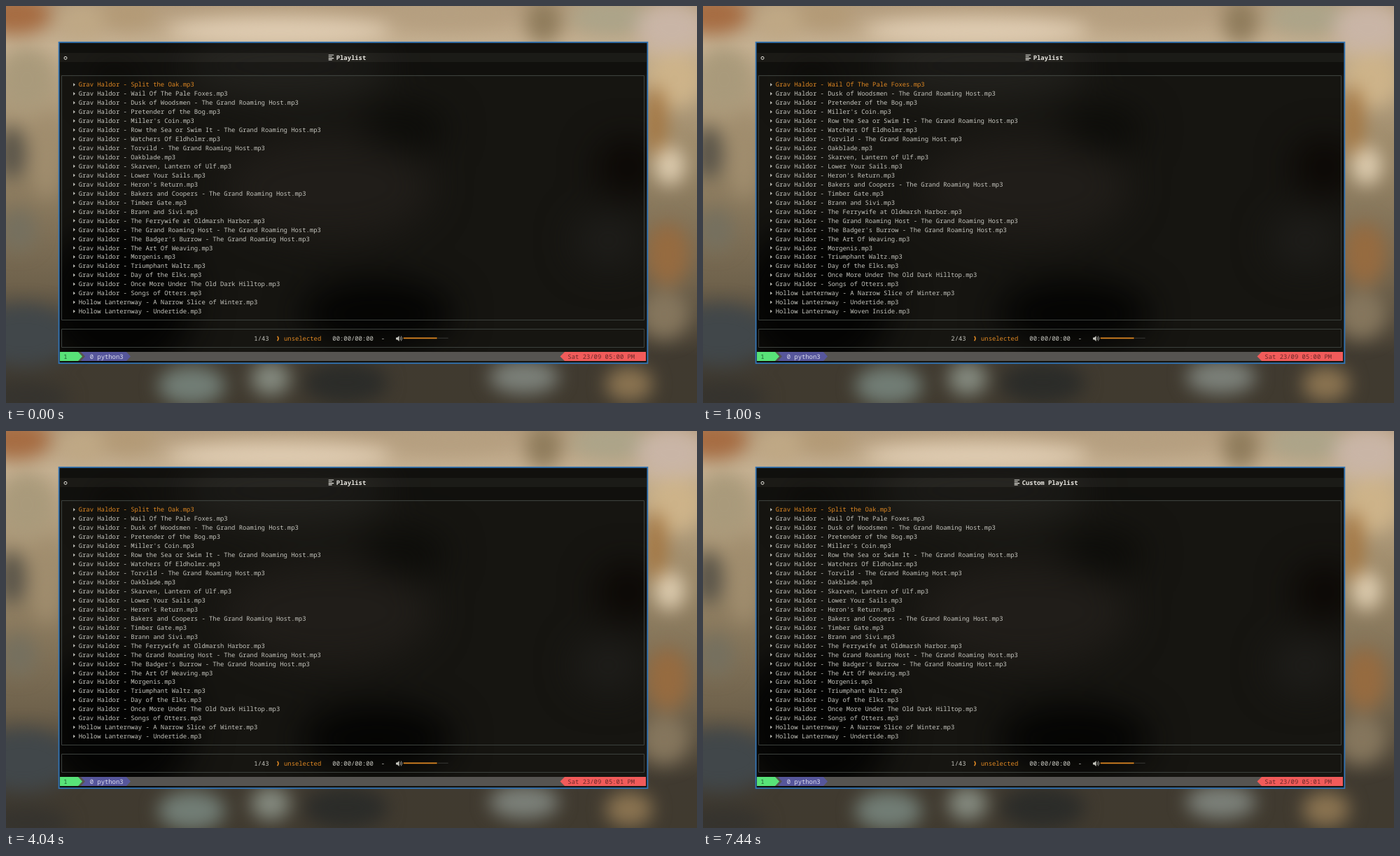
Recreate the animation shown at these times as an HTML page. Size 987x567 px, loop 8000 ms.

```html
<!DOCTYPE html>
<html lang="en">
<head>
<meta charset="utf-8">
<title>Terminal playlist</title>
<style>
html, body { margin: 0; width: 100%; height: 100%; overflow: hidden; background: #5a5140; }
svg { display: block; width: 987px; height: 567px; }
filter { color-interpolation-filters: sRGB; }
text { font: 8.889px "Noto Sans Mono", "DejaVu Sans Mono", monospace; white-space: pre; text-rendering: geometricPrecision; }
.bold { font-weight: 700; }
</style>
</head>
<body>
<svg viewBox="0 0 987 567">
  <defs>
    <linearGradient id="wall" x2="0" y2="1">
      <stop offset="0" stop-color="#b39c7d"/>
      <stop offset=".1" stop-color="#c6b192"/>
      <stop offset=".35" stop-color="#9d8a6a"/>
      <stop offset=".7" stop-color="#6f624c"/>
      <stop offset=".88" stop-color="#403a30"/>
      <stop offset="1" stop-color="#403a2f"/>
    </linearGradient>
    <filter id="soft" x="-100" y="-100" width="1187" height="767" filterUnits="userSpaceOnUse"><feGaussianBlur stdDeviation="13"/></filter>
    <filter id="dim" x="0" y="0" width="987" height="567" filterUnits="userSpaceOnUse"><feGaussianBlur stdDeviation="26"/></filter>
    <clipPath id="pane"><rect x="76" y="52" width="840" height="458"/></clipPath>
  </defs>
  <rect width="987" height="567" fill="url(#wall)"/>
  <g id="photo" filter="url(#soft)"></g>
  <rect x="76" y="52" width="840" height="458" fill="#161511"/>
  <g clip-path="url(#pane)"><g id="glass" filter="url(#dim)"></g></g>
  <rect x="75.6" y="51.8" width="840.8" height="458.4" fill="none" stroke="#3275b6" stroke-width="1.8"/>
  <g id="screen"></g>
</svg>
<script>
const LOOP = 8000, CELL = 16 / 3, ROW = 12.95;
const GREY = '#c5c5be', ORANGE = '#de8722', WHITE = '#e8e6e0', LINE = '#3c413d';
const $ = id => document.getElementById(id);

// Soft backdrop: x, y, rx, ry, colour
const photo = [
  [14, 12, 50, 28, '#a66c42'], [110, 22, 34, 26, '#bfa885'], [175, 12, 40, 22, '#b39a76'],
  [390, 36, 160, 20, '#dfccb2'], [635, 10, 90, 22, '#b59f80'], [768, 22, 26, 32, '#8f7c5c'],
  [865, 16, 60, 26, '#aca489'], [950, 32, 50, 38, '#c9b5a6'], [30, 105, 40, 45, '#a99a7b'],
  [8, 210, 20, 38, '#595449'], [58, 215, 20, 60, '#a08d6e'], [18, 320, 26, 30, '#75705f'],
  [25, 470, 75, 45, '#41474a'], [30, 560, 60, 24, '#35332e'],
  [955, 105, 40, 40, '#cdb389'], [928, 165, 16, 50, '#a47743'], [948, 228, 22, 28, '#dccbae'],
  [945, 355, 32, 45, '#966b40'], [940, 440, 36, 36, '#85765d'], [265, 542, 48, 28, '#727e76'],
  [378, 532, 28, 24, '#858b80'], [485, 538, 60, 30, '#2b2c29'], [740, 530, 50, 24, '#7c817a'],
  [890, 540, 34, 25, '#8b7451']
];
const glass = [
  [400, 85, 150, 50, '#22211d'], [155, 105, 28, 26, '#0c0b08'], [570, 175, 60, 30, '#0b0b08'],
  [460, 260, 150, 75, '#201d19'], [160, 420, 110, 110, '#040403'], [530, 440, 110, 50, '#040403'],
  [888, 230, 45, 40, '#0b0704'], [860, 335, 50, 40, '#1e1d1a']
];
const blobs = list => list.map(([x, y, rx, ry, c]) =>
  `<ellipse cx="${x}" cy="${y}" rx="${rx}" ry="${ry}" fill="${c}"/>`).join('');
$('photo').innerHTML = blobs(photo);
$('glass').innerHTML = blobs(glass);

const host = ' - The Grand Roaming Host';
const first = ['Split the Oak', 'Wail Of The Pale Foxes', 'Dusk of Woodsmen' + host, 'Pretender of the Bog',
  "Miller's Coin", 'Row the Sea or Swim It' + host, 'Watchers Of Eldholmr', 'Torvild' + host, 'Oakblade',
  'Skarven, Lantern of Ulf', 'Lower Your Sails', "Heron's Return", 'Bakers and Coopers' + host, 'Timber Gate',
  'Brann and Sivi', 'The Ferrywife at Oldmarsh Harbor', 'The Grand Roaming Host' + host,
  "The Badger's Burrow" + host, 'The Art Of Weaving', 'Morgenis', 'Triumphant Waltz', 'Day of the Elks',
  'Once More Under The Old Dark Hilltop', 'Songs of Otters'];
const second = ['A Narrow Slice of Winter', 'Undertide', 'Woven Inside', 'Moving East', 'Quiet Descent', 'Distant Bell'];
const songs = [...first.map(s => `Grav Haldor - ${s}.mp3`), ...second.map(s => `Hollow Lanternway - ${s}.mp3`)];
const TOTAL = 43, LAST_SONG = 'Hollow Lanternway - Waiting Room.mp3';
const COMMAND = 'create new playlist';

const X = col => 77 + col * CELL;
const Y = row => 60.5 + row * ROW;
const put = (col, row, s, fill = GREY, cls = '') =>
  `<text x="${X(col)}" y="${Math.round(Y(row) + 3.1)}" fill="${fill}" class="${cls}">${s}</text>`;
const shape = (d, fill) => `<path d="${d}" fill="${fill}"/>`;
const stroke = (d, color, w = 1) => `<path d="${d}" fill="none" stroke="${color}" stroke-width="${w}"/>`;
const frame = (top, bottom) => stroke(`M79.5 ${top}H911.5V${bottom}H79.5Z`, LINE);
const cursor = (col, row) => shape(`M${X(col)} ${Y(row) - 6.5}h${CELL}v13h${-CELL}z`, '#dcd8cf');

// Value of the last [time, value] pair already reached
const at = (t, steps) => steps.reduce((v, [from, next]) => t >= from ? next : v, undefined);

function header(title) {
  const col = title === 'Playlist' ? 74 : 71, x = X(col) - 11;
  const bars = [7.5, 5, 7.5, 5].map((w, i) => `M${x} ${70 + i * 2.3}h${w}`).join('');
  return shape('M77 53h838v14H77zM77 80h838v18H77z', 'rgba(0,0,0,.22)') +
    shape('M77 67h838v13H77z', 'rgba(255,255,255,.025)') +
    `<circle cx="85" cy="74.3" r="2" fill="none" stroke="${WHITE}"/>` +
    stroke(bars, WHITE, 1.1) + put(col, 1, title, WHITE, 'bold');
}

function list(pos, count) {
  let out = '';
  for (let i = 0; i < count && pos + i <= TOTAL; i++) {
    const n = pos + i, y = Y(4 + i);
    out += shape(`M96.2 ${y - 2.4}l2.7 2.4l-2.7 2.4z`, GREY) +
      put(5, 4 + i, n === TOTAL ? LAST_SONG : songs[n - 1], i ? GREY : ORANGE);
  }
  return out;
}

function footer(pos) {
  const shift = pos > 9 ? 1 : 0, y = Y(32), x = col => X(col + shift);
  return put(52, 32, `${pos}/${TOTAL}`) +
    stroke(`M${x(58) + 1.2} ${y - 3.2}q3 3.2 0 6.4`, ORANGE, 1.6) +
    put(60 + shift, 32, 'unselected', ORANGE) +
    put(73 + shift, 32, '00:00/00:00') + put(86 + shift, 32, '-') +
    shape(`M${x(90)} ${y - 1.5}h2l2.6 -2.5v8l-2.6 -2.5h-2z`, GREY) +
    stroke(`M${x(90) + 6} ${y - 2}q1.6 2 0 4m1.3 -5.5q3 3.5 0 7`, GREY, .8) +
    stroke(`M${x(92)} ${y - .6}h48`, ORANGE, 1.8) +
    stroke(`M${x(101) + 1} ${y - .6}h15`, '#393936', 1);
}

function status(t) {
  return shape('M77 494H914V507H77z', '#565451') +
    shape('M107 494H172L178 500.5L172 507H107L113 500.5z', '#56569b') +
    shape('M77 494H103L109 500.5L103 507H77z', '#58e278') +
    shape('M914 494H798L791.5 500.5L798 507H914z', '#f15b5a') +
    put(1, 34, '1', '#205a32') + put(8, 34, '0 python3', '#dcdcec') +
    put(136, 34, `Sat 23/09 05:0${t < 2560 ? 0 : 1} PM`, '#6b2a2a');
}

function shell(t) {
  const line = '$ ' + at(t, [[1960, ''], [2200, 'python3 app.py --dir '],
    [2560, 'python3 app.py --dir ~/s'], [2600, 'python3 app.py --dir ~/song']]);
  return put(0, 0, '~/music') + put(0, 1, line) + (t < 2800 ? cursor(line.length, 1) : cursor(0, 2));
}

function typed(t) {
  if (t < 4920) return '';
  if (t < 5080) return COMMAND[0];
  const step = Math.min(13, 1 + Math.floor((t - 5080) / (640 / 12)));
  return COMMAND.slice(0, 1 + Math.round(18 * step / 13));
}

function prompt(t) {
  const s = typed(t);
  return stroke('M294.75 443.2H696.2V480.5H294.75Z', '#1984c6', 1.8) +
    put(43, 31, s) + (t >= 4720 ? cursor(43 + s.length, 31) : '');
}

function body(t) {
  const pos = t >= 4040 ? 1 : at(t, [[0, 1], [200, 2], [360, 3], [400, 4], [520, 5],
    [800, 4], [840, 3], [1000, 2], [1640, 1], [1720, TOTAL]]);
  const tall = t < 4520 || t >= 6040;
  const full = t < 4520 || t >= 6120;
  return (tall ? frame(99.5, 448.5) + frame(461.5, 487.5) : frame(99.5, 422.5) + frame(435.5, 487.5)) +
    list(pos, full ? 26 : 24) + (full ? footer(pos) : t < 5960 ? prompt(t) : '');
}

function render(t) {
  let out = status(t);
  if (t >= 1960 && t < 3360) out += shell(t);
  else if (t < 1960 || t >= 4040) {
    out += header(t < 7440 ? 'Playlist' : 'Custom Playlist');
    if (t < 6840 || t >= 7440) out += body(t);
  }
  return out;
}

let start, shown;
function tick(now) {
  start ??= now;
  const next = render((now - start) % LOOP);
  if (next !== shown) $('screen').innerHTML = shown = next;
  requestAnimationFrame(tick);
}
$('screen').innerHTML = shown = render(0);
requestAnimationFrame(tick);
</script>
</body>
</html>
```
